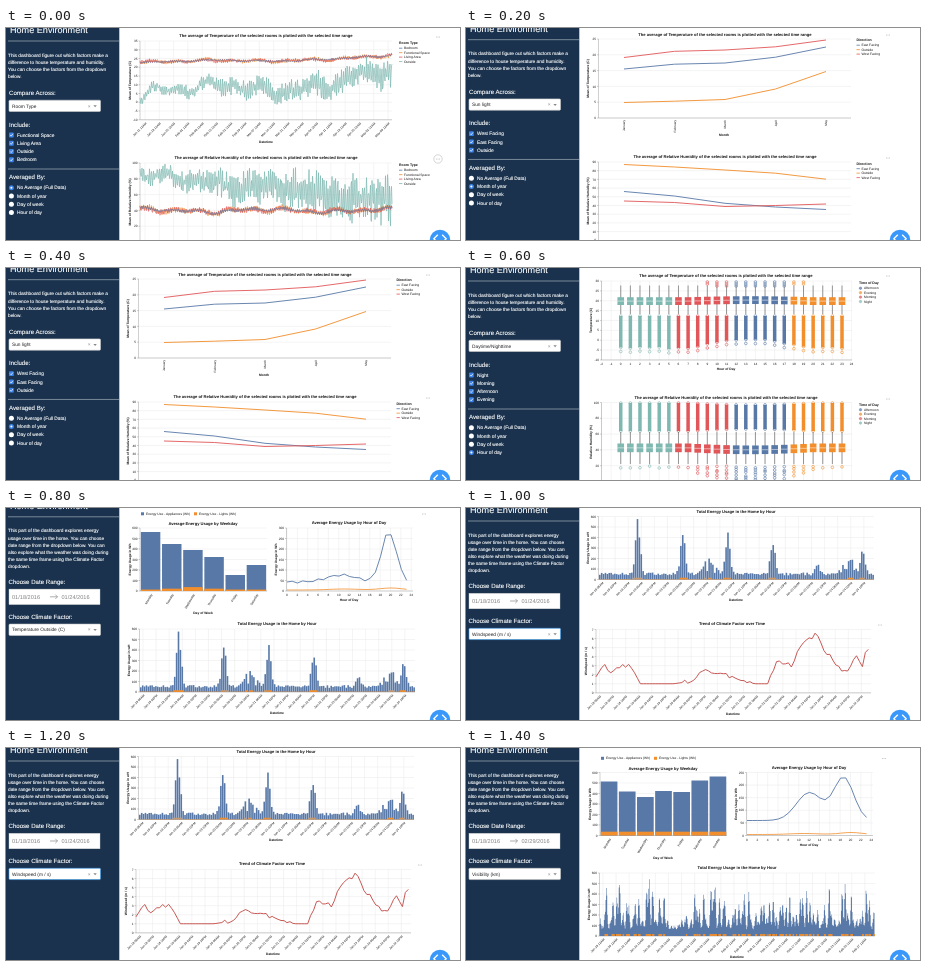
Write an HTML page that moves like this. It is 454 px wide and 212 px high and loops after 1.6 s.

```html
<!DOCTYPE html>
<html lang="en">
<head>
<meta charset="utf-8">
<title>Home dashboard</title>
<style>
html, body { margin: 0; width: 100%; height: 100%; overflow: hidden; background: #fff; }
svg { display: block; width: 454px; height: 212px; }
text { font-family: "Liberation Sans", Arial, sans-serif; text-rendering: geometricPrecision; }
</style>
</head>
<body>
<svg id="stage" viewBox="0 0 454 212" xmlns="http://www.w3.org/2000/svg"></svg>
<script>
const BLUE = '#5879a8', ORANGE = '#f28e2b', RED = '#e15759', TEAL = '#7fb8b1';
const NAVY = '#1a324d', GRID = '#e2e2e2', RULE = '#a3afbb', CHECK = '#3b82e8';
const stage = document.getElementById('stage');

function random(seed) {
  return () => {
    seed = (seed * 1664525 + 1013904223) % 4294967296;
    return seed / 4294967296;
  };
}

const range = (n, f) => Array.from({ length: n }, (_, i) => f(i));
const bell = (x, center, width) => Math.exp(-(((x - center) / width) ** 2));
const wander = (x, seed) => (Math.sin(x / 4.3 + seed) + Math.sin(x / 7.9 + seed * 2) + Math.sin(x / 19 + seed * 3)) / 2;

const text = (x, y, s, size, o = {}) =>
  `<text x="${x}" y="${y + size * .35}" font-size="${size}" fill="${o.fill || '#111'}"
    text-anchor="${o.anchor || 'start'}" font-weight="${o.bold ? 700 : 400}"
    ${o.stroke ? `stroke="${o.stroke}" stroke-width=".12"` : ''}
    ${o.turn ? `transform="rotate(${o.turn} ${x} ${y})"` : ''}>${s}</text>`;
const rect = (x, y, w, h, fill, more = '') =>
  `<rect x="${x}" y="${y}" width="${w}" height="${h}" fill="${fill}" ${more}/>`;
const circle = (x, y, r, fill, more = '') =>
  `<circle cx="${x}" cy="${y}" r="${r}" fill="${fill}" ${more}/>`;
const path = (d, color, w = .9) =>
  `<path d="${d}" fill="none" stroke="${color}" stroke-width="${w}" stroke-linejoin="round"/>`;
const line = (x1, y1, x2, y2, color, w = .5) => path(`M${x1} ${y1}L${x2} ${y2}`, color, w);
const poly = (pts, color, w) => path('M' + pts.map(p => p.map(v => +v.toFixed(2)).join(' ')).join('L'), color, w);

function lerpAt(pts, x) {
  let i = 1;
  while (i < pts.length - 1 && pts[i][0] < x) i++;
  const [a, b] = [pts[i - 1], pts[i]];
  return a[1] + (b[1] - a[1]) * (x - a[0]) / (b[0] - a[0]);
}

// Axes: values run from max at the top downwards by step, pitch pixels apart.
function axes(x0, x1, top, pitch, max, step, count, title, o = {}) {
  const bottom = top + pitch * (count - 1);
  let s = '';
  for (const x of o.cols || []) s += line(x, top, x, bottom, GRID, .4);
  for (let i = 0; i < count; i++) {
    const y = top + pitch * i;
    s += line(x0, y, x1, y, GRID, .4) + line(x0 - 1.5, y, x0, y, '#888', .4)
      + text(x0 - 2.5, y, max - step * i, 3.2, { anchor: 'end' });
  }
  s += line(x0, top, x0, bottom, '#888', .4) + line(x0, bottom, x1, bottom, '#888', .4);
  return s + text(x0 - 10.5, o.mid || (top + bottom) / 2, title, 3.3, { anchor: 'middle', bold: 1, turn: -90 });
}

const heading = (x, y, s, size = 4.1) => text(x, y, s, size, { anchor: 'middle', bold: 1 });
const dots = (x, y) => [-1.6, 0, 1.6].map(d => circle(x + d, y, .45, '#999')).join('');

function legend(x, y, title, items, mark) {
  return text(x, y, title, 3.5, { bold: 1 }) + items.map(([name, color], i) => {
    const cy = y + 5.2 + i * 4.45;
    const key = mark === 'dot' ? circle(x + 1.5, cy, 1.2, color, `fill-opacity=".7" stroke="${color}" stroke-width=".5"`)
      : line(x, cy, x + 3.4, cy, color, .8);
    return key + text(x + 5, cy, name, 3.35);
  }).join('');
}

const white = { fill: '#fff', stroke: '#fff' };

function sideBase(dy, lines) {
  return rect(0, 0, 113.3, 212, NAVY) + text(4, 2 + dy, 'Home Environment', 9.1, white)
    + line(2, 13 + dy, 113, 13 + dy, RULE, .7)
    + lines.map((s, i) => text(2, 27 + dy + i * 7.15, s, 4.75, white)).join('');
}

function picker(y, label, focus) {
  return rect(3, y, 91.5, 11.3, '#fff', `rx="1" stroke="${focus ? '#3c9cf0' : '#ccc'}" stroke-width=".6"`)
    + text(6, y + 5.7, label, 4.8, { fill: '#222' })
    + text(83.2, y + 5.6, '×', 5, { fill: '#888', anchor: 'middle' })
    + `<path d="M87.4 ${y + 5}h3.4l-1.7 2z" fill="#888"/>`;
}

function roomSide(dy, choice, rooms, pick) {
  let y = 107 + dy, s = sideBase(dy, ['This dashboard figure out which factors make a',
    'difference to house temperature and humidity.', 'You can choose the factors from the dropdown', 'below.']);
  s += text(3, 65 + dy, 'Compare Across:', 6.1, white) + picker(72.2 + dy, choice)
    + text(3, 96.5 + dy, 'Include:', 6.1, white);
  for (const room of rooms) {
    s += rect(3, y - 2.4, 4.8, 4.8, CHECK, 'rx=".9"')
      + path(`M4.2 ${y}l1 1.1 1.7 -2.3`, '#fff', .7) + text(11, y, room, 4.85, white);
    y += 8.25;
  }
  s += line(2, y + 1, 113, y + 1, RULE, .7) + text(3, y + 9, 'Averaged By:', 6.1, white);
  ['No Average (Full Data)', 'Month of year', 'Day of week', 'Hour of day'].forEach((name, i) => {
    const cy = y + 19.7 + i * 8.25;
    s += circle(5.4, cy, 2.5, i === pick ? CHECK : '#fff')
      + (i === pick ? circle(5.4, cy, 1, '#fff') : '') + text(11, cy, name, 4.85, white);
  });
  return s;
}

function energySide(dy, end, factor, focus) {
  const pale = { fill: '#808080' };
  return sideBase(dy, ['This part of the dashboard explores energy', 'usage over time in the home. You can choose',
    'date range from the dropdown below. You can', 'also explore what the weather was doing during',
    'the same time frame using the Climate Factor', 'dropdown.'])
    + text(2.5, 78.3 + dy, 'Choose Date Range:', 6.1, white)
    + rect(3, 85.3 + dy, 91, 15.5, '#fff', 'stroke="#ccc" stroke-width=".4"')
    + text(6, 93 + dy, '01/18/2016', 5.6, pale) + text(55.5, 93 + dy, end, 5.6, pale)
    + path(`M44 ${93 + dy}h7.5m-2.2 -2.2l2.2 2.2l-2.2 2.2`, '#777', .6)
    + text(2.5, 113 + dy, 'Choose Climate Factor:', 6.1, white) + picker(120.3 + dy, factor, focus);
}

const ROOM_TITLE = kind => `The average of ${kind} of the selected rooms is plotted with the selected time range`;
const TEMP = 'Mean of Temperature (C)', HUMID = 'Mean of Relative Humidity (%)';

function slanted(labels, x, step, y, angle = -45) {
  return labels.map((s, i) => text(x + step * i, y, s, 3.1, { anchor: 'end', turn: angle })).join('');
}

// "Mon-DD" labels starting on a day of the year (leap year), every gap days.
function dates(first, gap, count, times) {
  return range(count, i => {
    const d = new Date(Date.UTC(2016, 0, first + Math.floor(i / times.length) * gap));
    const month = ['Jan', 'Feb', 'Mar', 'Apr', 'May'][d.getUTCMonth()];
    return `${month}-${String(d.getUTCDate()).padStart(2, '0')} ${times[i % times.length]}`;
  });
}

function fullData() {
  const x0 = 134, x1 = 386, cols = range(18, i => 139 + i * 14.3);
  const keys = [['Bedroom', BLUE], ['Functional Space', ORANGE], ['Living Area', RED], ['Outside', TEAL]];
  const spring = x => Math.max(0, (x - 325) / 60), late = x => (x - x0) / (x1 - x0);
  const trace = (seed, color, f, w = .6) => {
    const rnd = random(seed);
    return poly(range(505, i => x0 + i / 2).map(x => [x, f(x, rnd)]), color, w);
  };
  const daily = (x, rnd) => Math.sin(x / 1.92 * 2 * Math.PI) * .6 + (rnd() - .5) * .9;
  const indoor = (base, swing, amp, seed) => [ORANGE, RED, BLUE].map((color, i) => trace(seed + i, color,
    (x, rnd) => base(x) + wander(x, seed) * swing + wander(x, seed + i) * .6 + daily(x, rnd) * (i < 2 ? amp : amp * .55))).join('');
  return roomSide(0, 'Room Type', ['Functional Space', 'Living Area', 'Outside', 'Bedroom'], 0)
    + heading(260, 8, ROOM_TITLE('Temperature'))
    + axes(x0, x1, 13, 8.75, 35, 5, 10, TEMP, { cols })
    + trace(11, TEAL, (x, rnd) => 60 + wander(x, 2) * 6 + 7 * bell(x, x0, 8) - spring(x) * 22
      + daily(x, rnd) * (5 + late(x) * 12), .7)
    + indoor(x => 33.5 - late(x) * 2 - spring(x) * 5, 1, 2, 21)
    + slanted(dates(11, 7, 18, ['12AM']), 140, 14.3, 95) + heading(260, 114, 'Datetime', 3.3)
    + legend(393, 15, 'Room Type', keys) + dots(432, 9)
    + heading(260, 130, ROOM_TITLE('Relative Humidity'))
    + axes(x0, x1, 135, 15.8, 100, 20, 6, HUMID, { cols, mid: 174 })
    + trace(31, TEAL, (x, rnd) => Math.max(136, 141 + late(x) * 6 + wander(x, 5) * 4
      + (.5 + daily(x, rnd) * .6) * (13 + late(x) * 38)), .7)
    + indoor(() => 182.5, 2.2, 3, 41) + legend(393, 137, 'Room Type', keys)
    + circle(432, 131, 4.2, '#fff', 'stroke="#aaa" stroke-width=".5"') + dots(432, 131);
}

function monthly() {
  const xs = range(5, i => 158 + i * 50.5);
  const curve = (ys, c) => poly(ys.map((y, i) => [xs[i], y]), c, .9);
  const keys = [['East Facing', BLUE], ['Outside', ORANGE], ['West Facing', RED]];
  return roomSide(-1.3, 'Sun light', ['West Facing', 'East Facing', 'Outside'], 1)
    + heading(259, 7, ROOM_TITLE('Temperature')) + axes(132.5, 385, 11, 15.8, 25, 5, 6, TEMP)
    + curve([74.5, 73.2, 71.5, 61, 43.5], ORANGE) + curve([29.5, 23.3, 22, 18.8, 12], RED)
    + curve([41, 36.2, 35, 29.2, 19], BLUE)
    + slanted(['January', 'February', 'March', 'April', 'May'], 158, 50.5, 92, -90)
    + heading(258, 107, 'Month', 3.3) + legend(390.5, 12, 'Direction', keys) + dots(422, 7)
    + heading(259, 128.5, ROOM_TITLE('Relative Humidity')) + axes(132.5, 385, 134, 8.7, 90, 10, 10, HUMID, { mid: 173 })
    + curve([136.5, 139, 142, 145.2, 151.2], ORANGE) + curve([163.5, 168, 175.3, 179, 181.5], BLUE)
    + curve([173, 174.5, 178.5, 177.5, 176], RED)
    + legend(390.5, 135.5, 'Direction', keys) + dots(422, 130);
}

function hourly() {
  const rnd = random(7), pitch = 9.62, x0 = 135.5;
  const cols = range(27, i => x0 + i * pitch);
  const keys = [['Afternoon', BLUE], ['Evening', ORANGE], ['Morning', RED], ['Night', TEAL]];
  const loose = (x, y, c) => circle(x, y, 1.35, 'none', `stroke="${c}" stroke-width=".6"`);
  const stack = (x, a, b, c) => line(x, a, x, b, c, 3.5) + loose(x, a, c) + loose(x, b, c);
  const box = (x, y, h, lo, hi, c) => line(x, lo, x, hi, '#333', .5) + rect(x - 3.3, y, 6.6, h, c)
    + line(x - 3.3, y + h / 2, x + 3.3, y + h / 2, '#fff', .5);
  let temp = '', damp = '';
  for (let h = 0; h < 24; h++) {
    const x = cols[h + 2], color = [TEAL, RED, BLUE, ORANGE][Math.floor(h / 6)];
    const warm = Math.max(0, Math.sin((h - 7) / 13 * Math.PI)), end = 83 - warm * 8 + rnd() * 2;
    temp += stack(x, 48, end - 4, color) + loose(x, end, color) + box(x, 29.2 - warm, 7.8, 17.5, 46, color);
    if (h > 8 && h < 20) for (let y = 14; y < 15 + warm * 5; y += 2) temp += loose(x, y, color);
    damp += stack(x, 135 + warm * 2, 163 - warm * 2, color) + box(x, 175.5 + warm * 2, 8.7, 164, 196, color);
    for (let i = 0; i < 1 + warm * 5; i++) damp += loose(x, 198 + i * 2.7 + rnd() * 2, color);
  }
  return roomSide(0, 'Daytime/Nighttime', ['Night', 'Morning', 'Afternoon', 'Evening'], 3)
    + heading(260, 8, ROOM_TITLE('Temperature'))
    + axes(x0, 386, 13, 9.87, 30, 5, 9, 'Temperature (C)', { cols }) + temp
    + cols.map((x, i) => text(x, 95.5, i - 2, 3.2, { anchor: 'middle' })).join('')
    + heading(260, 100.5, 'Hour of Day', 3.3) + legend(393, 15, 'Time of Day', keys, 'dot') + dots(422, 8)
    + heading(260, 129.5, ROOM_TITLE('Relative Humidity'))
    + axes(x0, 386, 134.5, 15.8, 100, 20, 6, 'Relative Humidity (%)', { cols, mid: 174 }) + damp
    + legend(393, 136.5, 'Time of Day', keys, 'dot') + dots(422, 131);
}

const ENERGY = 'Energy Usage in Wh';

// Upper row of the energy page; heights, light(i) and use(hour) are pixels above the baseline.
function averages(y, heights, light, use, max, count) {
  const base = y + 63, slot = 127 / heights.length, w = slot * .92;
  const days = ['Monday', 'Tuesday', 'Wednesday', 'Thursday', 'Friday', 'Saturday', 'Sunday'];
  const ticks = range(13, i => 281 + i * 10.35);
  const byHour = f => range(24, h => [281 + h * 5.2, base - f(h)]);
  return rect(135, y - 15.7, 3, 3, BLUE) + text(140, y - 14.2, 'Energy Use - Appliances (Wh)', 3.3)
    + rect(188, y - 15.7, 3, 3, ORANGE) + text(193, y - 14.2, 'Energy Use - Lights (Wh)', 3.3)
    + heading(197, y - 4, 'Average Energy Usage by Weekday') + heading(343, y - 5, 'Average Energy Usage by Hour of Day')
    + axes(134, 261, y, 10.5, 600, 100, 7, ENERGY)
    + heights.map((h, i) => {
      const x = 134 + slot * (i + .5);
      return rect(x - w / 2, base - h, w, h, BLUE) + rect(x - w / 2, base - light(i), w, light(i), ORANGE)
        + text(x + 1, base + 3, days[i], 3.2, { anchor: 'end', turn: -60 });
    }).join('')
    + heading(197, y + 85, 'Day of Week', 3.3)
    + axes(280.5, 407, y, 63 / (count - 1), max, 50, count, ENERGY, { cols: ticks })
    + ticks.map((x, i) => text(x, base + 4, i * 2, 3.2, { anchor: 'middle' })).join('')
    + heading(343, y + 72, 'Hour of Day', 3.3)
    + poly(byHour(use), BLUE, .9) + poly(byHour(h => 1 + bell(h, 11, 4) + 2 * bell(h, 20, 3)), ORANGE, .8)
    + dots(418, y - 14);
}

function total(y, bars, labels) {
  const step = 275 / labels.length, cols = labels.map((_, i) => 137 + i * step);
  return heading(271, y - 5, 'Total Energy Usage in the Home by Hour')
    + axes(133.5, 409, y, 10.5, 600, 100, 7, 'Energy Usage in wH', { cols }) + bars(y + 63)
    + slanted(labels, 138, step, y + 66) + heading(271, y + 83.5, 'Datetime', 3.3);
}

const weekLabels = dates(18, 1, 21, ['06AM', '02PM', '10PM']);

// One evening peak per day, with two broader busy spells.
function weekBars(base) {
  const rnd = random(5), evenings = [58, 44, 42, 36, 9, 24];
  return range(146, i => {
    const x = 134 + i * 1.885;
    const peak = evenings.reduce((sum, h, d) => sum + h * bell(x, 172 + d * 45, 3.2), 0);
    const busy = 17 * bell(x, 243, 9) + 17 * bell(x, 383, 9);
    const h = 4 + rnd() * 3 + peak * (.8 + rnd() * .25) + busy * rnd();
    const glow = h > 15 ? 1.8 : .4;
    return rect(x, base - h, 1.6, h, BLUE) + rect(x, base - glow, 1.6, glow, ORANGE);
  }).join('');
}

// Two random peaks a day over six weeks, drawn as touching bars.
function longBars(base) {
  const rnd = random(19), day = 6.4;
  const peaks = range(86, i => [133.5 + (i * .5 + rnd() * .4) * day, 8 + rnd() ** 1.7 * 48]);
  let blue = `M133.5 ${base}`, glow = '';
  for (let x = 133.5; x < 408; x += .55) {
    const quiet = 1 - .9 * bell(x, 209, 10);
    const peak = Math.max(...peaks.map(([px, h]) => h * bell(x, px, 1.1)));
    const h = 6 + rnd() * 4 + peak * quiet * (.75 + rnd() * .25);
    blue += `V${(base - h).toFixed(1)}h.55`;
    if (h > 18) glow += rect(x.toFixed(1), base - 2, .9, 2, ORANGE);
  }
  return `<path d="${blue}V${base}z" fill="${BLUE}"/>` + glow;
}

function weekEnergy() {
  const use = h => 9 + 7 * bell(h, 10.5, 4) + 50 * bell(h, 19.6, 2) + Math.sin(h * 2.4) * 1.1;
  return energySide(-4.2, '01/24/2016', 'Temperature Outside (C)')
    + averages(20, [59, 47, 41, 34, 16, 26], i => 1.4 + 2.5 * bell(i, 2, 1), use, 300, 7)
    + total(121, weekBars, weekLabels);
}

function windspeed() {
  const rnd = random(3), step = 275 / 21;
  const speeds = [[130, 1.9], [139, 3], [145, 2], [152, 3], [164, 3], [174, 1], [208, 1], [226, 1.3], [238, 2.7], [250, 2],
    [268, 1.8], [288, 1], [302, 1], [310, 3.5], [326, 3], [334, 5.2], [351, 6.6], [356, 5], [372, 3], [380, 2.1],
    [390, 4.2], [396, 2.9], [401, 5], [405, 4.5]];
  const wind = range(93, i => 130 + i * 2.96).map(x => {
    const v = lerpAt(speeds, x);
    return [x, 184.8 - 9.05 * (v + (v > 1.15 ? (rnd() - .5) * .5 : 0))];
  });
  return energySide(0, '01/24/2016', 'Windspeed (m / s)', true)
    + `<g transform="translate(-1)">${total(8.5, weekBars, weekLabels)}</g>`
    + heading(266, 116, 'Trend of Climate Factor over Time')
    + axes(130, 405, 121.5, 9.05, 7, 1, 8, 'Windspeed (m / s)', { cols: range(21, i => 133.5 + i * step) })
    + poly(wind, '#c5504b', .95) + slanted(weekLabels, 134.5, step, 188)
    + heading(267, 205.5, 'Datetime', 3.3) + dots(414, 117);
}

function longEnergy() {
  const use = h => 15 + 28 * bell(h, 12, 3.5) + 43 * bell(h, 18.6, 2.7);
  return energySide(0, '02/29/2016', 'Visibility (km)')
    + averages(24.5, [54, 44, 38.5, 44.5, 43.5, 55, 59], () => 3.8, use, 250, 6)
    + total(125, longBars, dates(18, 2, 21, ['12AM']));
}

const scenes = [fullData, monthly, hourly, weekEnergy, windspeed, longEnergy];
const order = [0, 1, 1, 2, 3, 4, 4, 5];
stage.innerHTML = rect(0, 0, 454, 212, '#fff') + scenes.map(f => `<g class="scene" display="none">${f()}</g>`).join('')
  + circle(434, 212, 10.3, '#3b98fb') + path('M431.8 206.8l-4 3.9l4 3.9M436.2 206.8l4 3.9l-4 3.9', '#fff', 1.3);

const groups = [...stage.querySelectorAll('.scene')];
const start = performance.now();

function show() {
  const t = Math.max(0, performance.now() - start) % 1600;
  const now = order[Math.floor(t / 200)];
  groups.forEach((g, i) => g.setAttribute('display', i === now ? 'inline' : 'none'));
  requestAnimationFrame(show);
}
show();
</script>
</body>
</html>
```
